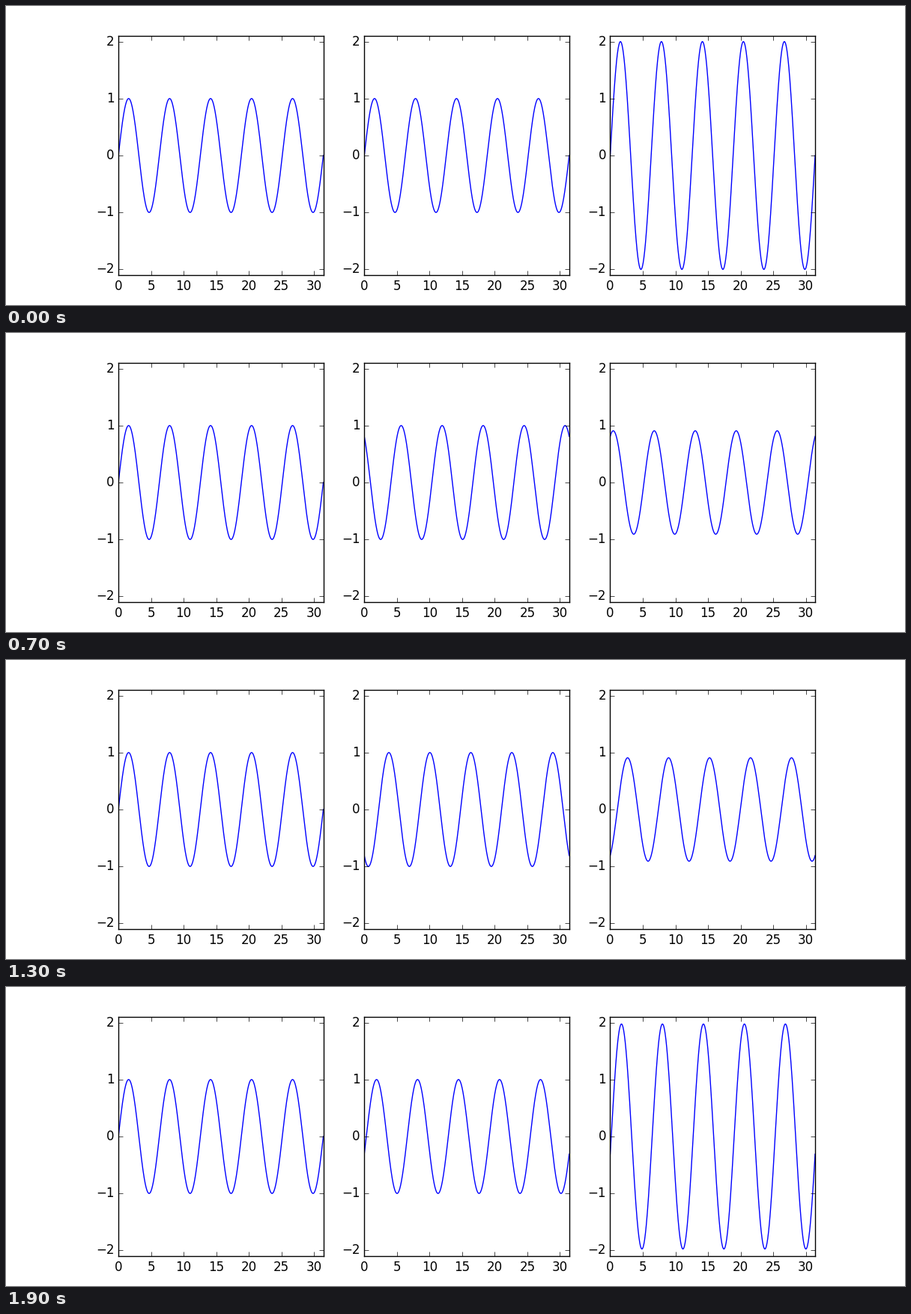
Animation, 1200 px wide and 400 px high, one loop 2000 ms. Source, as a matplotlib script:

```python
import numpy as np
import matplotlib.pyplot as plt
from matplotlib.animation import FuncAnimation

FRAMES = 20
INTERVAL = 100

plt.style.use("classic")
plt.rcParams.update({
    "font.family": "DejaVu Sans",
    "figure.facecolor": "white",
    "savefig.facecolor": "white",
    "savefig.dpi": 100,
})

x = np.linspace(0, 10 * np.pi, 1000)
fixed = np.sin(x)

fig, axes = plt.subplots(1, 3, figsize=(12, 4), dpi=100)
fig.subplots_adjust(left=0.125, right=0.9, bottom=0.1, top=0.9, wspace=0.2)


def add_wave(ax):
    ax.set_xlim(0, 10 * np.pi)
    ax.set_ylim(-2.1, 2.1)
    ax.set_xticks(range(0, 31, 5))
    ax.set_yticks(range(-2, 3))
    line, = ax.plot(x, fixed, color="blue", lw=1)
    return line


still, moving, total = [add_wave(ax) for ax in axes]


def update(frame):
    shifted = np.sin(x + 2 * np.pi * frame / FRAMES)
    moving.set_ydata(shifted)
    total.set_ydata(fixed + shifted)
    return moving, total


anim = FuncAnimation(fig, update, frames=FRAMES, interval=INTERVAL,
                     init_func=lambda: update(0), repeat=True, repeat_delay=0)
plt.show()
```
